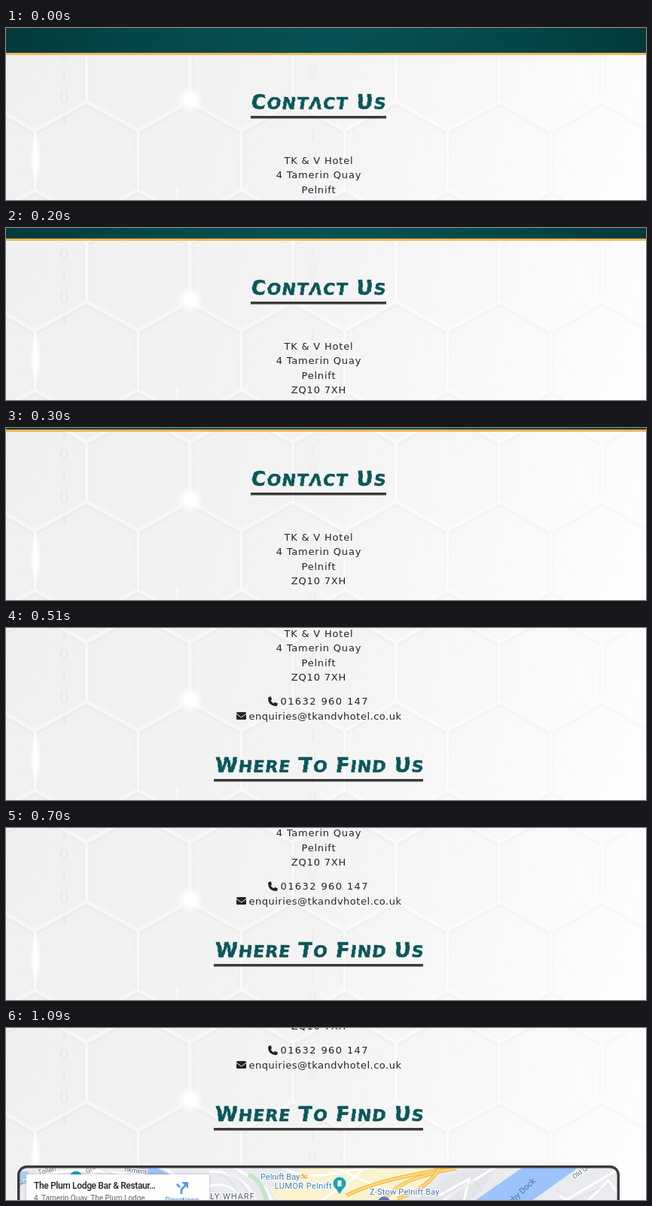
Recreate the animation shown at these times as an HTML page with a canvas. Size 850x229 px, loop 1.5 s.

```html
<!DOCTYPE html>
<html lang="en">
<head>
<meta charset="utf-8">
<title>Contact page scroll</title>
<style>
  html, body { margin: 0; width: 100%; height: 100%; overflow: hidden; background: #f4f4f4; }
  canvas { display: block; }
</style>
</head>
<body>
<canvas id="stage" width="850" height="229"></canvas>
<script>
const W = 850, H = 229, LOOP = 1500;
const ctx = document.getElementById('stage').getContext('2d');
const DARK = '#3a3a3d', INK = '#212529', TEAL = '#0b575b';

// [start time in ms, scroll offset in px]
const SCROLL = [[0, 0], [100, 9], [200, 19], [300, 31], [400, 92],
                [510, 169], [700, 189], [900, 222], [1090, 237]];

function scrollAt(t) {
  let y = 0;
  for (const [start, offset] of SCROLL) if (t >= start) y = offset;
  return y;
}

function text(str, x, y, font, color, opt = {}) {
  ctx.save();
  ctx.font = font;
  ctx.fillStyle = color;
  ctx.letterSpacing = (opt.gap || 0) + 'px';
  ctx.textAlign = opt.align || 'left';
  ctx.textBaseline = opt.base || 'alphabetic';
  ctx.translate(x, y);
  ctx.rotate(opt.turn || 0);
  if (opt.halo) {
    ctx.strokeStyle = opt.halo;
    ctx.lineWidth = 2.5;
    ctx.lineJoin = 'round';
    ctx.strokeText(str, 0, 0);
  }
  ctx.fillText(str, 0, 0);
  ctx.restore();
}

function shape(path, fill) {
  ctx.fillStyle = fill;
  ctx.fill(new Path2D(path));
}

function line(path, color, width) {
  ctx.strokeStyle = color;
  ctx.lineWidth = width;
  ctx.stroke(path instanceof Path2D ? path : new Path2D(path));
}

function disc(x, y, r, color) {
  ctx.fillStyle = color;
  ctx.beginPath();
  ctx.arc(x, y, r, 0, Math.PI * 2);
  ctx.fill();
}

// ---- fixed backdrop ----

function honeycomb() {
  const path = new Path2D(), step = 137, half = step / 2;
  for (let row = -1; row < 3; row++) {
    const top = 19 + row * 117.5, shift = row % 2 ? 38.5 : 107;
    for (let x = shift - step; x < W + step; x += step) {
      path.moveTo(x - half, top + 117.5);
      path.lineTo(x, top + 79);
      path.lineTo(x + half, top + 117.5);
      path.moveTo(x, top);
      path.lineTo(x, top + 79);
    }
  }
  return path;
}
const COMB = honeycomb();

function glow(x, y, rx, ry) {
  ctx.save();
  ctx.translate(x, y);
  ctx.scale(rx, ry);
  const g = ctx.createRadialGradient(0, 0, 0, 0, 0, 1);
  g.addColorStop(0, '#fff');
  g.addColorStop(0.4, 'rgba(255,255,255,.85)');
  g.addColorStop(1, 'rgba(255,255,255,0)');
  disc(0, 0, 1, g);
  ctx.restore();
}

function digits(str, x, y, step, alpha) {
  [...str].forEach((d, i) => text(d, x, y + i * step, '23px "Liberation Serif", serif',
    `rgba(120,120,120,${alpha})`, { align: 'center', base: 'middle' }));
}

function backdrop() {
  const g = ctx.createLinearGradient(0, 0, W, H);
  g.addColorStop(0, '#f0f0f0');
  g.addColorStop(0.45, '#f3f3f3');
  g.addColorStop(0.8, '#f9f9f9');
  g.addColorStop(1, '#fefefe');
  ctx.fillStyle = g;
  ctx.fillRect(0, 0, W, H);
  digits('10101', 77, 9, 28, 0.08);
  digits('10', 407, 32, 28, 0.05);
  digits('1010', 407, 144, 28, 0.05);
  ctx.save();
  ctx.lineJoin = 'round';
  ctx.translate(0, 2);
  line(COMB, 'rgba(0,0,0,.018)', 8);
  ctx.translate(0, -2);
  line(COMB, 'rgba(255,255,255,.3)', 6);
  line(COMB, 'rgba(255,255,255,.55)', 3);
  ctx.restore();
  digits('1', 227, 219, 28, -0);
  text('1', 227, 227, '23px "Liberation Serif", serif', 'rgba(255,255,255,.7)', { align: 'center' });
  glow(244, 96, 18, 18);
  disc(244, 96, 9, 'rgba(255,255,255,.8)');
  glow(39, 175, 7, 38);
}

// ---- page content ----

function header() {
  const g = ctx.createRadialGradient(425, 0, 20, 425, 0, 440);
  g.addColorStop(0, '#065153');
  g.addColorStop(0.6, '#044547');
  g.addColorStop(1, '#033839');
  ctx.fillStyle = g;
  ctx.fillRect(0, 0, W, 33);
  ctx.fillStyle = '#f3b655';
  ctx.fillRect(0, 33, W, 3);
}

function capitals(str, x, y, gap) {
  ctx.fillStyle = ctx.strokeStyle = TEAL;
  ctx.lineWidth = 0.5;
  for (const ch of str) {
    const small = ch >= 'a' && ch <= 'z';
    const glyph = ch === 'a' ? 'Λ' : ch.toUpperCase();
    ctx.font = `bold ${small ? 22 : 27}px "DejaVu Sans", sans-serif`;
    ctx.fillText(glyph, x, y);
    ctx.strokeText(glyph, x, y);
    x += ctx.measureText(glyph).width + gap;
  }
}

// Heading in small capitals, cut into slightly shifted strips
function heading(str, x, y, gap, ruleX, ruleW) {
  const cuts = [0, 0.8, 0, -0.8], tall = 6;
  cuts.forEach((dx, i) => {
    ctx.save();
    ctx.beginPath();
    ctx.rect(0, y - 22 + i * tall, W, tall);
    ctx.clip();
    capitals(str, x + dx, y, gap);
    ctx.restore();
  });
  ctx.fillStyle = DARK;
  ctx.fillRect(ruleX, y + 9, ruleW, 3.5);
}

function details() {
  const font = '13px "DejaVu Sans", sans-serif';
  ['TK & V Hotel', '4 Tamerin Quay', 'Pelnift', 'ZQ10 7XH'].forEach((row, i) =>
    text(row, 415.4, 181 + i * 19.4, font, INK, { gap: 0.8, align: 'center' }));
  text('01632 960 147', 364.5, 271, font, INK, { gap: 1.4 });
  text('enquiries@tkandvhotel.co.uk', 322.5, 290.5, font, INK, { gap: 0.5 });

  ctx.save();
  ctx.translate(348, 260);
  shape('M1 1L3.6 0L5.2 4L3.6 5.4Q5 8 7.7 9.4L9 7.8L13 9.4L12 12.4Q11 13 10 13Q0 12 0 2.5Z', INK);
  ctx.translate(-42, 21);
  ctx.beginPath();
  ctx.roundRect(0, 0, 13, 10, 1.5);
  ctx.fillStyle = INK;
  ctx.fill();
  line('M0 2.4L6.5 7L13 2.4', '#f4f4f4', 1);
  ctx.restore();
}

function pin(x, y, color) {
  shape(`M${x - 6} ${y + 5}L${x} ${y + 14}L${x + 6} ${y + 5}Z`, color);
  disc(x, y, 8.5, color);
  ctx.fillStyle = '#fff';
  ctx.fillRect(x - 2.5, y - 4, 5, 8);
}

function streets() {
  ctx.fillStyle = '#e9ebee';
  ctx.fillRect(0, 0, W, 300);
  shape('M15 8H30L26 20L15 32Z', '#a9cdf7');
  shape('M168 0H194L222 14H188Z', '#9cc3fa');
  shape('M398 0H590L548 30L500 70H372L350 30Z', '#fbf2cf');
  shape('M545 46L590 12L650 4L632 32L600 60Z', '#e3e5e8');

  ['M15 24Q70 2 130 8T270 22', 'M96 24L132 0', 'M205 0L250 30',
   'M270 8Q320 6 338 60', 'M262 30Q305 14 320 60', 'M300 0L345 30L360 60',
   'M365 0Q390 20 440 10T540 0', 'M400 60L455 22L480 0', 'M430 0L520 40',
   'M560 60L640 8L655 0', 'M575 40L615 18L605 60', 'M640 60L705 0',
   'M720 60L815 4', 'M760 60L800 20L815 40', 'M735 40L770 60'
  ].forEach(p => line(p, '#ffffff', 3));
  ['M112 0L150 14L190 4', 'M283 12Q308 18 312 60', 'M292 10Q322 18 326 60',
   'M585 44L622 20L632 34', 'M745 50L790 30', 'M660 24L690 0'
  ].forEach(p => line(p, '#d2d6db', 1));
  line('M322 12Q346 24 347 60', '#c5e6c8', 6);

  shape('M604 60L690 0H764L680 60Z', '#9cc3fa');
  ['M452 40Q480 26 520 17T598 2', 'M490 60Q512 28 545 17T598 4', 'M520 44Q560 32 578 0'
  ].forEach(p => {
    line(p, '#f3b64b', 5);
    line(p, '#fddc7f', 2.4);
  });
}

function labels() {
  const road = '9px Roboto, sans-serif', place = '11px Roboto, sans-serif';
  const grey = '#5f6670', blue = '#3b7fb5', halo = { halo: '#fff' };
  text('Tollen', 43, 12, road, grey, { turn: -0.2, ...halo });
  text('Grav', 108, 11, road, grey, { turn: -0.55, ...halo });
  text('nkment', 157, 8, road, grey, { turn: 0.12, ...halo });
  text('Old Qu', 755, 18, road, grey, { turn: -0.62, ...halo });
  text('an', 18, 25, road, blue);
  text('Wenby Dock', 660, 63, place, '#3d76b5', { turn: -0.76 });
  text('LY WHARF', 271, 45, place, '#555b63', { gap: 1, ...halo });
  text('Pelnift Bay', 338, 19, place, blue, halo);
  text('LUMOR Pelnift', 433, 31, place, blue, { align: 'right', gap: 0.4, ...halo });
  text('Z-Stow Pelnift Bay', 483, 39, place, '#4a72b5', { gap: 0.2, ...halo });
  line('M391 13H401M391 16H401M393 11L399 18', '#f0a13a', 1.2);
  pin(443, 24, '#17a3bb');
  pin(93, 16, '#17a3bb');
  disc(502, 50, 8.5, '#5b73c2');
}

function card() {
  ctx.save();
  ctx.shadowColor = 'rgba(0,0,0,.25)';
  ctx.shadowBlur = 3;
  ctx.fillStyle = '#fff';
  ctx.fillRect(27, 12, 243, 110);
  ctx.restore();
  text('The Plum Lodge Bar & Restaur…', 37, 31, '500 12px Roboto, sans-serif', '#202124', { gap: -0.35 });
  text('4, Tamerin Quay, The Plum Lodge', 37, 47, '10px Roboto, sans-serif', '#5f6368');
  line('M233 38V32L239 26M227 25L231 29', '#5f97f2', 3);
  shape('M233 22H242V31Z', '#5f97f2');
  text('Directions', 234, 50, '10px Roboto, sans-serif', '#4285f4', { align: 'center' });
}

function map() {
  ctx.save();
  ctx.translate(0, 420);
  ctx.save();
  ctx.beginPath();
  ctx.roundRect(16, 1, 798, 300, 11);
  ctx.clip();
  streets();
  labels();
  card();
  ctx.restore();
  ctx.beginPath();
  ctx.roundRect(16.7, 1.7, 796.6, 300, 11);
  ctx.strokeStyle = DARK;
  ctx.lineWidth = 3.4;
  ctx.stroke();
  ctx.restore();
}

function draw(t) {
  backdrop();
  ctx.save();
  ctx.translate(0, -scrollAt(t));
  header();
  heading('Contact Us', 325.5, 108, 1.3, 325, 180);
  details();
  heading('Where To Find Us', 278, 361, 1, 276, 278);
  map();
  ctx.restore();
}

const begin = performance.now();
function tick() {
  draw((performance.now() - begin) % LOOP);
  requestAnimationFrame(tick);
}
tick();
</script>
</body>
</html>
```
